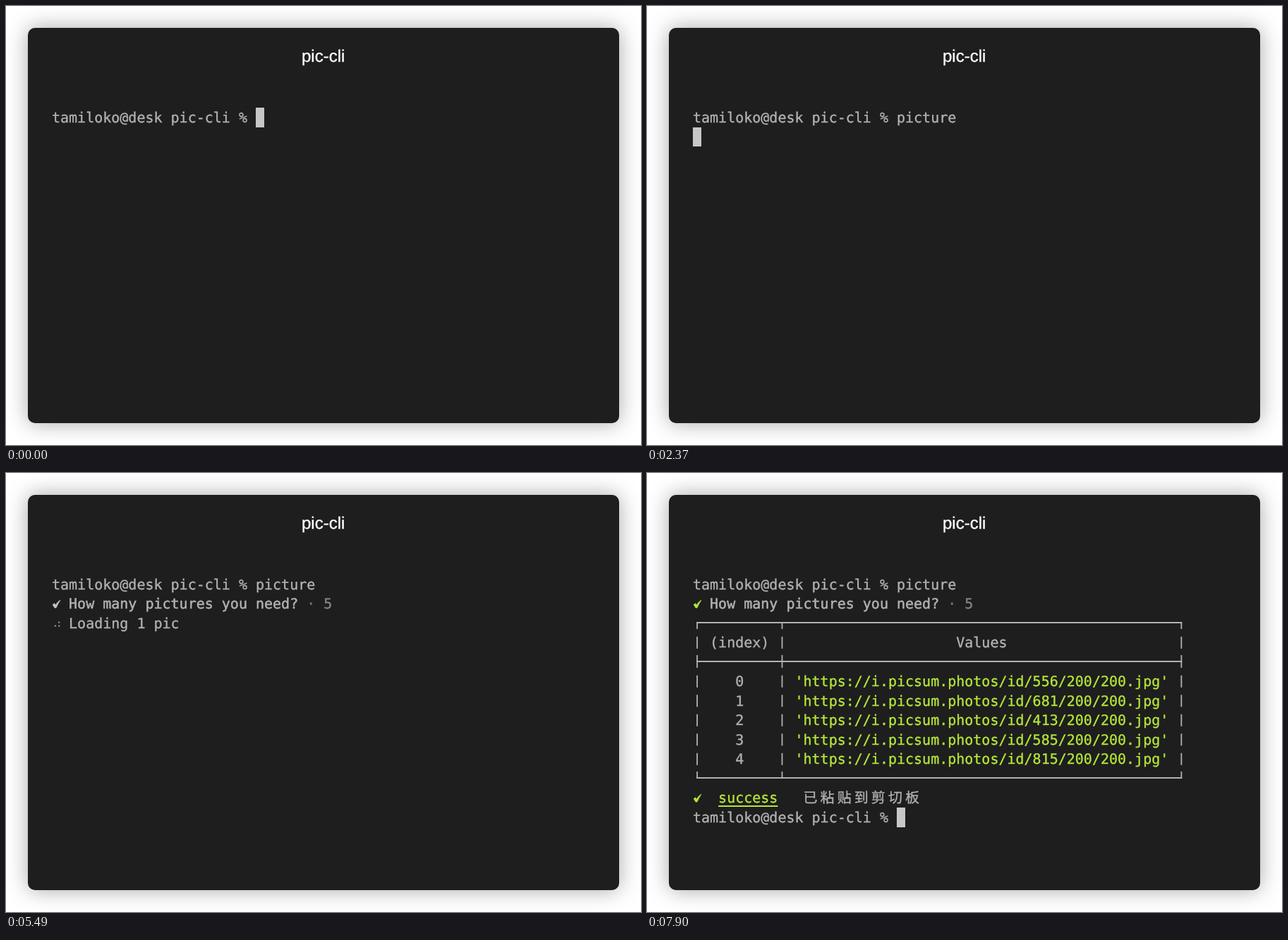
An HTML page for the animation above (8 s loop, 900x622 px).

```html
<!DOCTYPE html>
<html lang="en">
<head>
<meta charset="utf-8">
<title>pic-cli</title>
<style>
  html, body { margin: 0; width: 100%; height: 100%; overflow: hidden; background: #fff; }
  #win {
    position: absolute; left: 31px; top: 31px; width: 838px; height: 560px;
    border-radius: 10px; background: #1e1e1e; box-shadow: 0 0 30px rgba(0, 0, 0, .35);
  }
  svg { position: absolute; left: 0; top: 0; }
  text {
    font: 20px "DejaVu Sans Mono", "Noto Sans Mono", monospace;
    text-rendering: geometricPrecision; white-space: pre; stroke-width: .35px;
  }
  .title { font: 24px "Liberation Sans", Arial, sans-serif; }
  .cjk { font-family: "Noto Sans CJK SC", "Noto Sans CJK", sans-serif; }
  .bold { stroke-width: .5px; }
</style>
</head>
<body>
<div id="win"></div>
<svg width="900" height="622">
  <text class="title" x="449.7" y="79" text-anchor="middle" fill="#fff" stroke="#fff">pic-cli</text>
  <g id="screen"></g>
</svg>
<script>
const LOOP = 8000, CELL = 12.04, ROW = 27.5, LEFT = 65, TOP = 144.3;
const FG = '#b2b2b2', MID = '#868686', DIM = '#747474', GREEN = '#b5e639';
const PROMPT = 'tamiloko@desk pic-cli % ', COMMAND = 'picture';

const KEYS = [1190, 1350, 1430, 1640, 1740, 1850, 1900];
const ENTER = 2370, ASK = 2550, SUBMIT = 4260, DONE = 7900;
const COUNTS = [3080, 3230, 3370, 3530];
const LOADS = [6220, 6550, 6960, 7280];
const TICK = 81.5;

// Braille dot numbers of each spinner pose
const SPINNER = ['124', '145', '1456', '456', '3456', '356', '236', '1236', '123', '1234'];
const IDS = [556, 681, 413, 585, 815];

const screen = document.getElementById('screen');
const colX = c => LEFT + c * CELL;
const rowY = r => TOP + r * ROW;
const passed = (times, t) => times.filter(x => t >= x).length;

const text = (row, col, str, fill = FG, cls = '') =>
  `<text class="${cls}" x="${colX(col)}" y="${rowY(row) + 20.4}" fill="${fill}" stroke="${fill}">${str}</text>`;

const rect = (x, y, w, h, fill = FG) =>
  `<rect x="${x}" y="${y}" width="${w}" height="${h}" fill="${fill}"/>`;

const cursor = (row, col) =>
  `<g shape-rendering="crispEdges">${rect(colX(col), rowY(row), CELL, ROW, '#c7c7c7')}</g>`;

const check = (row, fill) =>
  `<path transform="translate(${LEFT} ${rowY(row)})" fill="${fill}" stroke="${fill}" stroke-width=".8"
    d="M1.2 14.8 L3.8 13 L5.2 15.4 Q8 10.6 12 8.2 Q8.8 12.8 6 19.2 H4 Z"/>`;

function spinner(row, pose) {
  return [...SPINNER[pose]].map(d => {
    const x = d > 3 ? 75.2 : 69.9, y = rowY(row) + 7.3 + (d - 1) % 3 * 5;
    return `<circle cx="${x}" cy="${y}" r="1.2" fill="#a0a0a0"/>`;
  }).join('');
}

function question(row, mark, sep, value) {
  return mark + text(row, 2, 'How many pictures you need?', FG, 'bold') +
    text(row, 30, sep, DIM) + text(row, 32, value, MID);
}

function table(row) {
  const bars = [0, 10, 57].map(c => colX(c) + 5.2);
  const rule = (r, up, down) => {
    const y = rowY(r) + 12.7;
    return rect(bars[0], y - 1, bars[2] - bars[0] + 1.8, 2) +
      bars.map(x => rect(x, y - up, 1.8, up + down)).join('');
  };
  const sides = r => bars.map(x => rect(x, rowY(r) + 5, 1.8, 17)).join('');
  return rule(row, 1, 9) + sides(row + 1) +
    text(row + 1, 2, '(index)') + text(row + 1, 31, 'Values') +
    rule(row + 2, 9, 9) +
    IDS.map((id, i) => sides(row + 3 + i) + text(row + 3 + i, 5, i) +
      text(row + 3 + i, 12, `'https://i.picsum.photos/id/${id}/200/200.jpg'`, GREEN)).join('') +
    rule(row + 8, 9, 1);
}

function success(row) {
  return check(row, GREEN) + text(row, 3, 'success', GREEN) +
    rect(colX(3), rowY(row) + 24.2, 7 * CELL, 2, GREEN) +
    [...'已粘贴到剪切板'].map((ch, i) => text(row, 13 + 2 * i, ch, FG, 'cjk')).join('');
}

function render(t) {
  const typed = passed(KEYS, t);
  let out = text(0, 0, PROMPT + COMMAND.slice(0, typed));
  if (t < ENTER) return out + cursor(0, PROMPT.length + typed);
  if (t < ASK) return out + cursor(1, 0);
  if (t < SUBMIT) {
    const count = 1 + passed(COUNTS, t);
    return out + question(1, text(1, 0, '?', MID), '›', count) + cursor(1, 33);
  }
  out += question(1, check(1, t < DONE ? '#c4c4c4' : GREEN), '·', 5);
  if (t < DONE) {
    const pose = Math.floor((t - SUBMIT) / TICK) % SPINNER.length;
    return out + spinner(2, pose) + text(2, 2, `Loading ${1 + passed(LOADS, t)} pic`);
  }
  return out + table(2) + success(11) + text(12, 0, PROMPT) + cursor(12, PROMPT.length);
}

let shown = '';
function frame() {
  // Screen updates land on a 10 ms grid
  const t = Math.floor(performance.now() % LOOP / 10) * 10;
  const next = render(t);
  if (next !== shown) screen.innerHTML = shown = next;
  requestAnimationFrame(frame);
}
frame();
</script>
</body>
</html>
```
